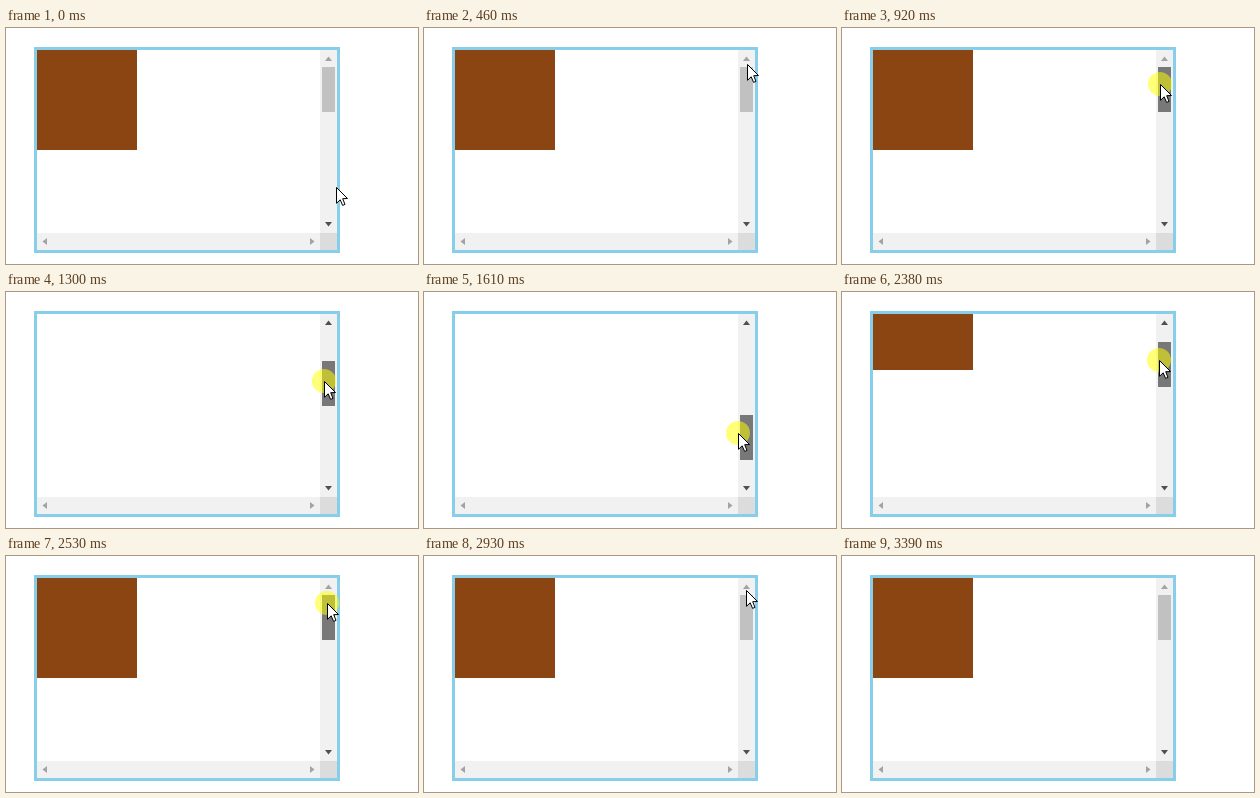
Write an HTML page with a canvas that moves like this. It is 412 px wide and 236 px high and loops after 3770 ms.

```html
<!DOCTYPE html>
<html lang="en">
<head>
<meta charset="utf-8">
<title>Dragging a scrollbar</title>
<style>
html, body { margin: 0; width: 100%; height: 100%; overflow: hidden; background: #fff; }
canvas { display: block; }
</style>
</head>
<body>
<canvas id="stage" width="412" height="236"></canvas>
<script>
const ctx = document.getElementById('stage').getContext('2d');
const LOOP = 3770, STEP = 76.7;
const THUMB_TOP = 39, THUMB_END = 143, THUMB_H = 45;
const SCROLL_RATIO = 417 / 104;

// Each leg moves the pointer from x0 to x1 through the heights in ys.
// grip: distance from thumb top to pointer while dragging.
const legs = [
  { at: 0, x0: 330, x1: 330, ys: [159] },
  { at: 70, x0: 330, x1: 321, ys: [157, 146, 122, 90, 58, 36, 48] },
  { at: 610, x0: 319, x1: 318, ys: [53, 56] },
  { at: 920, x0: 318, x1: 318, ys: [56, 59, 64, 71, 80, 89, 97], grip: 20 },
  { at: 1460, x0: 317, x1: 309, ys: [108, 125, 141, 152, 158, 162, 163], grip: 18 },
  { at: 2070, x0: 310, x1: 321, ys: [145, 119, 98, 82, 68, 56, 47], grip: 18 },
  { at: 2610, x0: 321, x1: 322, ys: [42, 37, 34], grip: 18 },
  { at: 2930, x0: 322, x1: 405, ys: [34, 52, 88, 135, 182, 222, 260] }
];

const clamp = (v, lo, hi) => Math.min(hi, Math.max(lo, v));

function pose(t) {
  const leg = legs.filter(l => l.at <= t).pop();
  const last = leg.ys.length - 1;
  let k = 0;
  while (k < last && t >= leg.at + Math.round((k + 1) * STEP / 10) * 10) k++;
  const x = Math.round(leg.x0 + (leg.x1 - leg.x0) * (last ? k / last : 0));
  const y = leg.ys[k];
  const drag = !!leg.grip;
  const thumb = drag ? clamp(y - leg.grip, THUMB_TOP, THUMB_END) : THUMB_TOP;
  const hover = x >= 316 && x < 329 && y >= thumb && y < thumb + THUMB_H;
  return { x, y, drag, thumb, hover };
}

function rect(color, x, y, w, h) {
  ctx.fillStyle = color;
  ctx.fillRect(x, y, w, h);
}

function shape(points, fill, stroke) {
  ctx.beginPath();
  points.forEach(([x, y]) => ctx.lineTo(x, y));
  ctx.closePath();
  ctx.fillStyle = fill;
  ctx.fill();
  if (stroke) {
    ctx.strokeStyle = stroke;
    ctx.lineWidth = 1;
    ctx.stroke();
  }
}

function arrowV(base, tip, enabled) {
  shape([[319, base], [326, base], [322.5, tip]], enabled ? '#505050' : '#a3a3a3');
}

function arrowH(base, tip) {
  shape([[base, 210], [base, 217], [tip, 213.5]], '#a3a3a3');
}

function drawPointer(x, y) {
  ctx.save();
  ctx.translate(x, y);
  shape([[.5, .5], [.5, 16.3], [4.2, 12.8], [6.6, 18.4], [9, 17.4],
         [6.7, 11.7], [11.5, 11.5]], '#fff', '#000');
  ctx.restore();
}

function draw(t) {
  const p = pose(t);
  rect('#fff', 0, 0, 412, 236);
  rect('#87ceeb', 28, 19, 306, 206);
  rect('#fff', 31, 22, 300, 200);

  // scrolled content
  ctx.save();
  ctx.beginPath();
  ctx.rect(31, 22, 283, 183);
  ctx.clip();
  rect('#8b4513', 31, 22 - Math.round((p.thumb - THUMB_TOP) * SCROLL_RATIO), 100, 100);
  ctx.restore();

  // scrollbars
  rect('#f1f1f1', 314, 22, 17, 183);
  rect('#f1f1f1', 31, 205, 283, 17);
  rect('#dcdcdc', 314, 205, 17, 17);
  rect(p.drag ? '#787878' : p.hover ? '#a8a8a8' : '#c1c1c1', 316, p.thumb, 13, THUMB_H);
  arrowV(33, 28.5, p.thumb > THUMB_TOP);
  arrowV(194, 198.5, p.thumb < THUMB_END);
  arrowH(41, 36.5);
  arrowH(304, 308.5);

  if (p.drag) {
    ctx.beginPath();
    ctx.arc(p.x, p.y, 12, 0, Math.PI * 2);
    ctx.fillStyle = 'rgba(255, 255, 0, .53)';
    ctx.fill();
  }
  drawPointer(p.x, p.y);
}

const start = performance.now();
function tick() {
  draw((performance.now() - start) % LOOP);
  requestAnimationFrame(tick);
}
tick();
</script>
</body>
</html>
```
